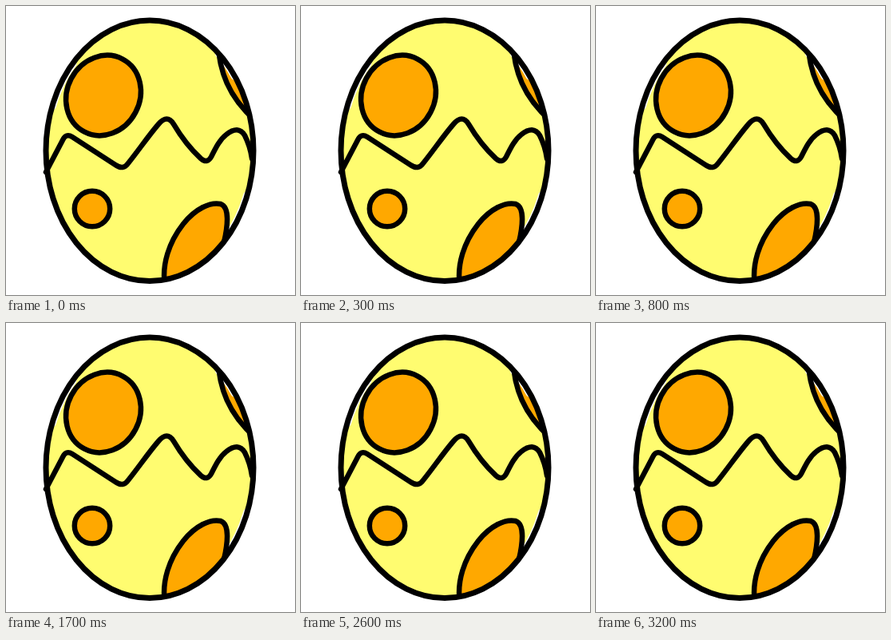
Recreate the animation shown at these times as an HTML page with a canvas. Size 362x362 px, loop 3.6 s.

```html
<!DOCTYPE html>
<html lang="en">
<head>
<meta charset="utf-8">
<title>Wobbling egg</title>
<style>
html, body { margin: 0; width: 100%; height: 100%; overflow: hidden; background: #fff; }
canvas { display: block; }
</style>
</head>
<body>
<canvas id="stage" width="362" height="362"></canvas>
<script>
const ctx = document.getElementById('stage').getContext('2d');
const YELLOW = '#fffc70', ORANGE = '#ffa800';
const LOOP = 3600;
const rad = deg => deg * Math.PI / 180;

function oval(x, y, rx, ry = rx, tilt = 0) {
  const p = new Path2D();
  p.ellipse(x, y, rx, ry, rad(tilt), 0, Math.PI * 2);
  return p;
}

// Spots cut off by the shell run past its edge and are clipped.
const upright = {
  egg: [180, 181.3, 130, 163.2, 0],
  gaps: [[200, 222], [312, 325], [20, 42]],
  spots: [
    oval(122, 112, 45.5, 51.5, 28),
    oval(108, 254, 22.2),
    new Path2D('M265 43C267 81 278 114 314 145L350 140L330 40Z'),
    new Path2D('M199 350C195 324 204 296 222 273C237 254 256 245 269 248C280 252 278 275 273 296L290 350Z')
  ],
  crack: new Path2D('M50 208L71 168Q75 159 83 164L137 199Q147 206 153 197C166 181 178 163 191 148Q202 135 210 148C220 165 231 179 244 191Q252 198 257 189C263 177 268 167 276 161Q291 149 299 162Q306 176 308 191')
};

const right = {
  egg: [181, 181.5, 176.4, 140.7, -50.7],
  gaps: [[-92, -84], [-62, -53]],
  spots: [
    oval(154.3, 78.8, 38.5, 40, 25),
    oval(72.7, 217.4, 38.4),
    new Path2D('M321 62C313 96 317 146 340 188L361 170L350 60Z'),
    new Path2D('M151 350C162 314 181 271 205 248C223 231 240 234 240 256C238 284 227 308 215 345Z')
  ],
  crack: new Path2D('M54 122C65 104 78 90 91 81Q96 78 96 86C96 109 98 131 100 152C131 143 163 131 197 126Q204 125 204 132C205 160 202 187 205 214C229 200 257 187 287 185Q296 185 296 194C295 220 297 238 293 266')
};

const left = {
  egg: [181, 181.5, 176.4, 140.7, 50.7],
  gaps: [[137, 142], [171, 176]],
  spots: [
    oval(83, 137.7, 45.5, 75.5, -5),
    oval(143.5, 271.5, 21.8),
    new Path2D('M128 8C150 39 194 51 246 45L240 0Z'),
    new Path2D('M342 189C328 172 309 160 292 161C274 164 273 195 278 226C283 256 295 281 312 303L360 290Z')
  ],
  crack: new Path2D('M83 282C79 267 76 251 75 234C99 232 127 234 154 234Q161 234 160 227C156 201 157 175 152 147C176 153 199 161 222 170C219 146 206 125 205 99Q206 96 213 98C240 101 272 101 298 108')
};

const steps = [[500, upright], [800, right], [2300, upright], [2600, left], [LOOP, upright]];

function draw({ egg, gaps, spots, crack }) {
  const [x, y, rx, ry, tilt] = egg;
  const shell = oval(...egg);
  ctx.fillStyle = '#fff';
  ctx.fillRect(0, 0, 362, 362);
  ctx.lineCap = ctx.lineJoin = 'round';

  ctx.save();
  ctx.clip(shell);
  ctx.fillStyle = YELLOW;
  ctx.fill(shell);
  ctx.fillStyle = ORANGE;
  spots.forEach(s => ctx.fill(s));

  // unpainted slivers along the rim
  ctx.strokeStyle = '#fff';
  ctx.lineWidth = 10;
  for (const [a, b] of gaps) {
    ctx.beginPath();
    ctx.ellipse(x, y, rx, ry, rad(tilt), rad(a), rad(b));
    ctx.stroke();
  }

  ctx.strokeStyle = '#000';
  ctx.lineWidth = 6.5;
  spots.forEach(s => ctx.stroke(s));
  ctx.restore();

  ctx.strokeStyle = '#000';
  ctx.lineWidth = 6.5;
  ctx.stroke(crack);
  ctx.lineWidth = 7;
  ctx.stroke(shell);
}

const start = performance.now();
let shown;
function tick() {
  const t = (performance.now() - start) % LOOP;
  const pose = steps.find(([end]) => t < end)[1];
  if (pose !== shown) draw(shown = pose);
  requestAnimationFrame(tick);
}
tick();
</script>
</body>
</html>
```
